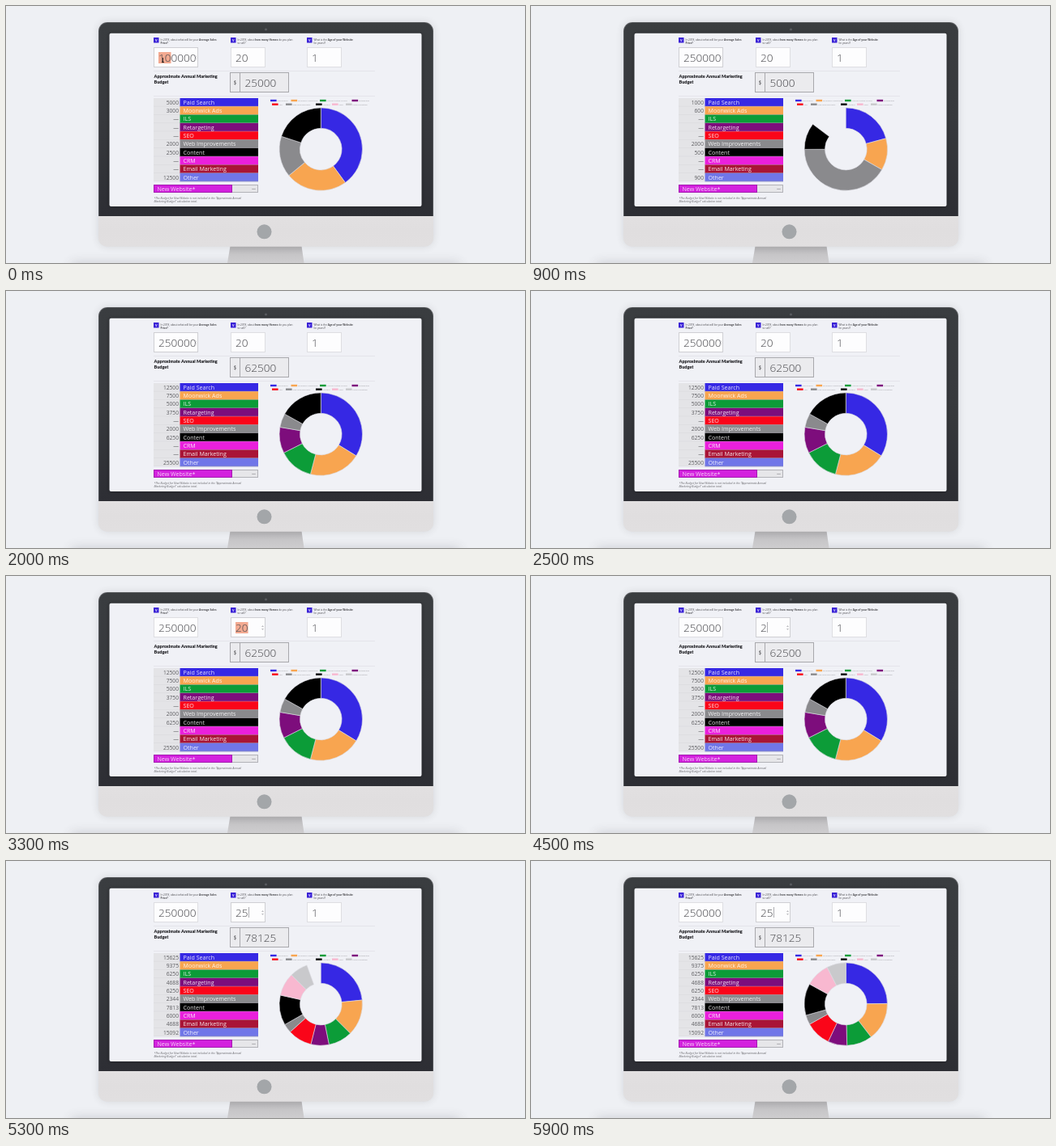
An HTML page with a canvas for the animation above (6 s loop, 640 by 318 pixels).

```html
<!DOCTYPE html>
<html lang="en">
<head>
<meta charset="utf-8">
<title>Marketing budget calculator</title>
<style>
html, body { margin: 0; width: 100%; height: 100%; overflow: hidden; background: #eef0f4; }
canvas { display: block; width: 640px; height: 318px; }
</style>
</head>
<body>
<canvas id="stage" width="640" height="318"></canvas>
<script>
const ctx = document.getElementById('stage').getContext('2d');
const LOOP = 6000;
const SPIN = 1000;
const BODY = '"Open Sans", "Noto Sans", sans-serif';
const HEADING = 'Lato, "Open Sans", sans-serif';
const INK = '#4a4a4e';

// label, bar colour, chart colour when it differs
const channels = [
  ['Paid Search', '#3628e4'],
  ['Moonwick Ads', '#f8a550'],
  ['ILS', '#0c9c38'],
  ['Retargeting', '#7d0d7c'],
  ['SEO', '#fa0519'],
  ['Web Improvements', '#8a8a8d'],
  ['Content', '#000000'],
  ['CRM', '#ea20dc', '#f8b8d0'],
  ['Email Marketing', '#a91436', '#c9c9cc'],
  ['Other', '#7076e8']
];

const budgets = [
  { at: -SPIN, total: 25000, split: [5000, 3000, 0, 0, 0, 2000, 2500, 0, 0, 12500] },
  { at: 520, total: 5000, split: [1000, 600, 0, 0, 0, 2000, 500, 0, 0, 900] },
  { at: 1000, total: 62500, split: [12500, 7500, 5000, 3750, 0, 2000, 6250, 0, 0, 25500] },
  { at: 4785, total: 78125, split: [15625, 9375, 6250, 4688, 6250, 2344, 7813, 6000, 4688, 15092] }
];

const prices = [[0, '100000'], [200, '20000'], [700, '250000']];
const homes = [[0, '20'], [4100, '2'], [4650, '25']];
const SELECT_HOMES = 2800;

const latest = (steps, t) => steps.filter(s => s[0] <= t).pop()[1];
const easeOutQuart = p => 1 - Math.pow(1 - p, 4);

function rect(x, y, w, h, fill, stroke) {
  ctx.fillStyle = fill;
  ctx.fillRect(x, y, w, h);
  if (stroke) {
    ctx.strokeStyle = stroke;
    ctx.lineWidth = 1;
    ctx.strokeRect(x + 0.5, y + 0.5, w - 1, h - 1);
  }
}

function text(str, x, y, size, { color = INK, weight = 400, align = 'left', family = BODY } = {}) {
  ctx.font = `${weight} ${size}px ${family}`;
  ctx.fillStyle = color;
  ctx.textAlign = align;
  ctx.fillText(str, x, y);
  return x + ctx.measureText(str).width;
}

function path(points, fill) {
  ctx.beginPath();
  points.forEach(p => ctx.lineTo(...p));
  ctx.closePath();
  ctx.fillStyle = fill;
  ctx.fill();
}

function rounded(x, y, w, h, radii, fill) {
  ctx.beginPath();
  ctx.roundRect(x, y, w, h, radii);
  ctx.fillStyle = fill;
  ctx.fill();
}

function disc(x, y, r, fill) {
  ctx.beginPath();
  ctx.arc(x, y, r, 0, Math.PI * 2);
  ctx.fillStyle = fill;
  ctx.fill();
}

function fade(y0, y1, ...colors) {
  const g = ctx.createLinearGradient(0, y0, 0, y1);
  colors.forEach((c, i) => g.addColorStop(i / (colors.length - 1), c));
  return g;
}

function withShadow(color, blur, paint) {
  ctx.save();
  ctx.shadowColor = color;
  ctx.shadowBlur = blur;
  paint();
  ctx.restore();
}

function drawMonitor() {
  rect(0, 0, 640, 318, '#eef0f4');
  withShadow('rgba(70,70,80,.3)', 14, () => rounded(80, 319, 480, 8, 4, '#d8d8dc'));
  path([[276.5, 297], [364.5, 297], [367.5, 318], [273, 318]], fade(297, 318, '#b2b1b3', '#c6c5c7', '#cecdcf'));
  withShadow('rgba(60,60,70,.16)', 10, () => rounded(114, 20, 413, 277.5, 11, '#e1dfe0'));
  rounded(114, 20, 413, 240, [11, 11, 0, 0], '#606266');
  rounded(114.7, 20.7, 411.6, 239.3, [10.5, 10.5, 0, 0], fade(20, 260, '#3a3d40', '#37393d', '#2d2e34'));
  rounded(114, 260, 413, 37.5, [0, 0, 10, 10], fade(260, 297, '#e2e0e1', '#e0dedf', '#e1dfe0'));
  disc(320.5, 29, 1.6, '#585b5f');
  disc(318.5, 279.3, 9, '#a3a6a9');
  withShadow('rgba(0,0,0,.35)', 5, () => rounded(127.5, 33.7, 385, 214.3, 2, '#f0f1f6'));
}

function drawQuestion(x, parts, second, bold) {
  rect(x, 39, 6.5, 6.5, '#3a22d6');
  text('v', x + 3.2, 43.8, 4.5, { color: '#d8d4ff', weight: 700, align: 'center' });
  let pen = x + 8.5;
  parts.forEach((part, i) => { pen = text(part, pen, 42.6, 3.15, { weight: i === 1 ? 700 : 400 }); });
  text(second, x + 8.5, 47.2, 3.15, { weight: bold ? 700 : 400 });
}

function drawField(x, width, value, { selected = 0, caret = false, focus = false } = {}) {
  rect(x, 51, width, 25, '#fdfdfe', focus ? '#cfcfd3' : '#dedee2');
  const left = x + 6;
  ctx.font = `300 13.6px ${BODY}`;
  if (selected) {
    rect(left, 57, ctx.measureText(value.slice(0, selected)).width, 14, '#f3aa91');
  }
  const end = text(value, left, 68.6, 13.6, { weight: 300 });
  if (caret) rect(Math.round(end), 57, 0.7, 13, '#8a8a90');
  if (focus) {
    path([[x + width - 5, 63], [x + width - 3.5, 61], [x + width - 2, 63]], '#bcbcc0');
    path([[x + width - 5, 65], [x + width - 3.5, 67], [x + width - 2, 65]], '#bcbcc0');
  }
}

function drawInputs(t) {
  drawQuestion(182, ['In 2018, about what will be your ', 'Average Sales'], 'Price?', true);
  drawQuestion(277, ['In 2018, about ', 'how many Homes', ' do you plan'], 'to sell?');
  drawQuestion(371, ['What is the ', 'Age of your Website'], '(in years)?');

  const onHomes = t >= SELECT_HOMES;
  const typingHomes = t >= homes[1][0];
  const selectingPrice = t < prices[1][0];
  drawField(182, 55, latest(prices, t), { selected: selectingPrice ? 2 : 0, focus: !onHomes });
  drawField(277, 43, latest(homes, t), {
    selected: onHomes && !typingHomes ? 2 : 0,
    caret: typingHomes,
    focus: onHomes
  });
  drawField(371, 43, '1');
  if (selectingPrice) {
    rect(193, 64, 1, 6, '#2b2220');
    rect(192, 69, 3, 1, '#2b2220');
  }
}

function drawBudget(total) {
  const heading = { color: '#1e1e22', weight: 900, family: HEADING };
  rect(182, 80, 273, 0.7, '#e0e0e5');
  text('Approximate Annual Marketing', 182.5, 89.2, 5.5, heading);
  text('Budget', 182.5, 95.8, 5.5, heading);
  rect(276, 82, 73, 25, '#ebebee', '#a8a8ac');
  rect(288, 82, 1, 25, '#a8a8ac');
  text('$', 282.5, 97.4, 6.6, { align: 'center' });
  text(total, 294.5, 100.2, 13.6, { weight: 300 });
  rect(182, 111, 273, 0.7, '#e0e0e5');
}

function drawTable(split) {
  const pitch = 10.32;
  const muted = { color: '#5c5c60', align: 'right' };
  rect(182, 114, 32.5, 103, '#e4e4e7');
  channels.forEach(([label, color], i) => {
    const y = 114 + i * pitch;
    rect(182, y + pitch - 0.5, 32.5, 0.5, '#d6d6da');
    rect(214.5, y, 96.5, pitch, color);
    rect(214.5, y + pitch - 0.5, 96.5, 0.5, '#9c98a4');
    text(split[i] || '—', 213, y + 7.7, 6.7, muted);
    text(label, 218.5, y + 7.7, 7.1, { color: 'rgba(255,255,255,.88)' });
  });
  rect(182, 221, 129, 10, '#e6e6e9', '#b2b2b8');
  rect(182, 221, 97, 10, '#d321de', '#a41bb0');
  text('New Website*', 186.5, 228.6, 7.1, { color: 'rgba(255,255,255,.8)' });
  text('—', 308, 228.2, 5, muted);
  const note = ['*The Budget for New Website is not included in the “Approximate Annual', 'Marketing Budget” calculation total.'];
  note.forEach((line, i) => text(line, 182.5, 239 + i * 4.2, 3.4, { color: '#66666b', weight: 'italic 400' }));
}

function drawLegend() {
  const rows = [
    [[326, 'Paid Search'], [351.5, 'Moonwick Advertising'], [387, 'Internet Listing Service'], [426.5, 'Retargeting']],
    [[328, 'SEO'], [345, 'Web Improvements'], [382, 'Content'], [402, 'CRM'], [419, 'Email Marketing']]
  ];
  let i = 0;
  rows.forEach((row, r) => row.forEach(([x, label]) => {
    const [, bar, slice = bar] = channels[i++];
    const y = 115.8 + r * 4.7;
    rect(x, y, 7.6, 2.4, slice);
    text(label, x + 8.6, y + 2.1, 2.4, { color: '#98989d' });
  }));
}

function drawDonut({ split, at }, t) {
  const shares = split.slice(0, -1);
  const sum = shares.reduce((a, b) => a + b);
  const sweep = Math.PI * 2 * easeOutQuart(Math.min(1, (t - at) / SPIN));
  let angle = -Math.PI / 2;
  shares.forEach((share, i) => {
    if (!share) return;
    const [, bar, slice = bar] = channels[i];
    const end = angle + sweep * share / sum;
    ctx.beginPath();
    ctx.arc(388.3, 177.1, 51.2, angle, end);
    ctx.arc(388.3, 177.1, 25.8, end, angle, true);
    ctx.closePath();
    ctx.fillStyle = slice;
    ctx.fill();
    ctx.strokeStyle = '#dcdce2';
    ctx.lineWidth = 0.6;
    ctx.stroke();
    angle = end;
  });
}

function draw(t) {
  const budget = budgets.filter(b => b.at <= t).pop();
  drawMonitor();
  drawInputs(t);
  drawBudget(budget.total);
  drawTable(budget.split);
  drawLegend();
  drawDonut(budget, t);
}

const start = performance.now();
function tick() {
  draw((performance.now() - start) % LOOP);
  requestAnimationFrame(tick);
}
tick();
</script>
</body>
</html>
```
